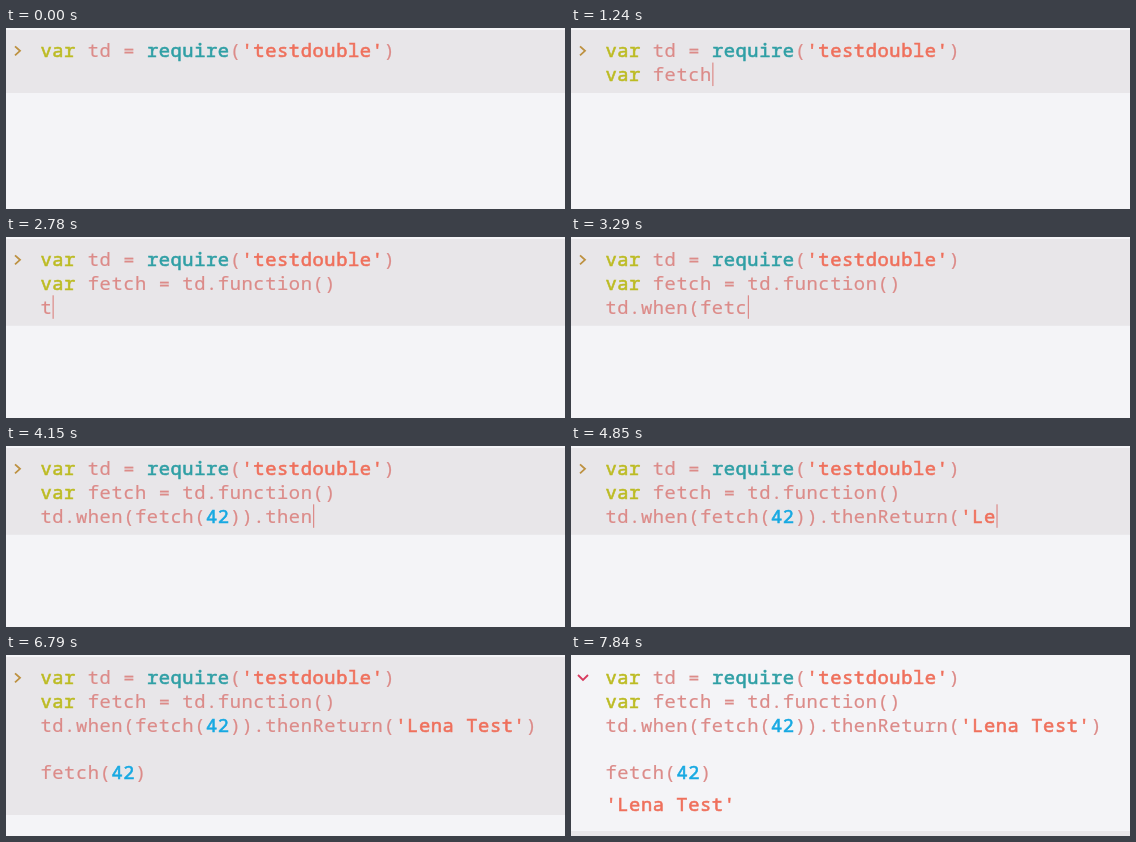
These frames come from a looping animation (559x181 px, 8000 ms). An HTML page:

```html
<!DOCTYPE html>
<html lang="en">
<head>
<meta charset="utf-8">
<title>Typing a test double</title>
<style>
  html, body { margin: 0; width: 100%; height: 100%; overflow: hidden; background: #f4f4f7; }
  svg { display: block; width: 559px; height: 181px; }
  text {
    font: 400 18.8px "Noto Sans Mono", "DejaVu Sans Mono", monospace;
    letter-spacing: calc(11.84px - .6em);
    white-space: pre;
    color: #dc8b89;
    fill: currentColor;
    stroke: currentColor;
    stroke-width: .2;
  }
  tspan { stroke-width: .6; }
  .keyword { color: #bcbb22; }
  .builtin { color: #2f9fa5; }
  .string { color: #ef705c; }
  .number { color: #17a9e2; }
  .cell { fill: #e8e6e9; }
  #cursor { fill: #dc8b89; }
  #chevron { fill: none; stroke-width: 1.8; }
</style>
</head>
<body>
<svg viewBox="0 0 559 181">
  <rect id="cell" class="cell" y="2" width="559"/>
  <rect id="nextCell" class="cell" y="176" width="559" height="5"/>
  <path id="chevron"/>
  <g id="code"></g>
  <text id="output" x="34.4" y="156"><tspan class="string">'Lena Test'</tspan></text>
  <rect id="cursor" width="1.2" height="23.5"/>
</svg>
<script>
const LOOP = 8000, LEFT = 34.4, ADVANCE = 11.84, LINE = 23.75, BASELINE = 29;
const RUN = 6790, RESULT = 6900, SETTLED = 7020;
const PAUSE = 175; // rest between the end of one phrase and the next

const opening = "var td = require('testdouble')\n";
const phrases = [
  { at: 500, text: "var " },
  { at: 900, text: "fetch = t" },
  { at: 1750, text: "d.function" },
  { at: 2260, text: "()\n" },
  { at: 2780, text: "td.when(fetc" },
  { at: 3400, text: "h(" },
  { at: 3630, text: "42)).thenReturn" },
  { at: 4670, text: "('Lena Test'" },
  { at: 5360, text: ")" },
  { at: 5710, text: "\n\nfetch(42)" },
  { at: 6550, text: "\n" }
];

const byId = id => document.getElementById(id);
const clamp = v => Math.max(0, Math.min(1, v));
const setAttrs = (el, attrs) => {
  for (const name in attrs) el.setAttribute(name, attrs[name]);
};
const show = (el, on) => { el.style.visibility = on ? "visible" : "hidden"; };

const [cell, nextCell, chevron, code, output, cursor] =
  ["cell", "nextCell", "chevron", "code", "output", "cursor"].map(byId);

// Each phrase is typed evenly, first character at once, last one a pause before the next phrase.
function typedText(t) {
  return phrases.reduce((typed, { at, text }, i) => {
    if (t < at) return typed;
    const end = (phrases[i + 1]?.at ?? RUN) - PAUSE;
    const progress = clamp((t - at) / Math.max(1, end - at));
    return typed + text.slice(0, 1 + Math.floor(progress * (text.length - 1)));
  }, opening);
}

function highlight(line) {
  const classes = ["string", "keyword", "builtin", "number"];
  return line.replace(/('[^']*'?)|\b(var)\b|\b(require)\b|\b(\d+)\b/g, (token, ...groups) =>
    `<tspan class="${classes[groups.slice(0, 4).findIndex(Boolean)]}">${token}</tspan>`);
}

let drawnText = null;

function drawCode(text) {
  if (text === drawnText) return;
  drawnText = text;
  const lines = text.split("\n");
  const last = lines.length - 1;
  code.innerHTML = lines.map((line, i) =>
    `<text x="${LEFT}" y="${BASELINE + i * LINE}">${highlight(line)}</text>`).join("");
  setAttrs(cell, { height: 15.5 + lines.length * LINE });
  setAttrs(cursor, {
    x: LEFT + .3 + lines[last].length * ADVANCE,
    y: 10.8 + last * LINE
  });
}

function draw(t) {
  drawCode(typedText(t));
  const done = t >= RESULT;
  const settle = clamp((t - RESULT) / (SETTLED - RESULT));
  cell.style.opacity = 1 - settle;
  nextCell.style.opacity = settle;
  show(output, done);
  show(cursor, t >= phrases[0].at && t < RUN);
  setAttrs(chevron, done
    ? { d: "M7 20l5 5 5-5", stroke: "#d83a5e" }
    : { d: "M9 18.3l5 4.5-5 4.5", stroke: "#bd9140" });
}

const origin = performance.now();
function tick() {
  draw((performance.now() - origin) % LOOP);
  requestAnimationFrame(tick);
}
tick();
</script>
</body>
</html>
```
